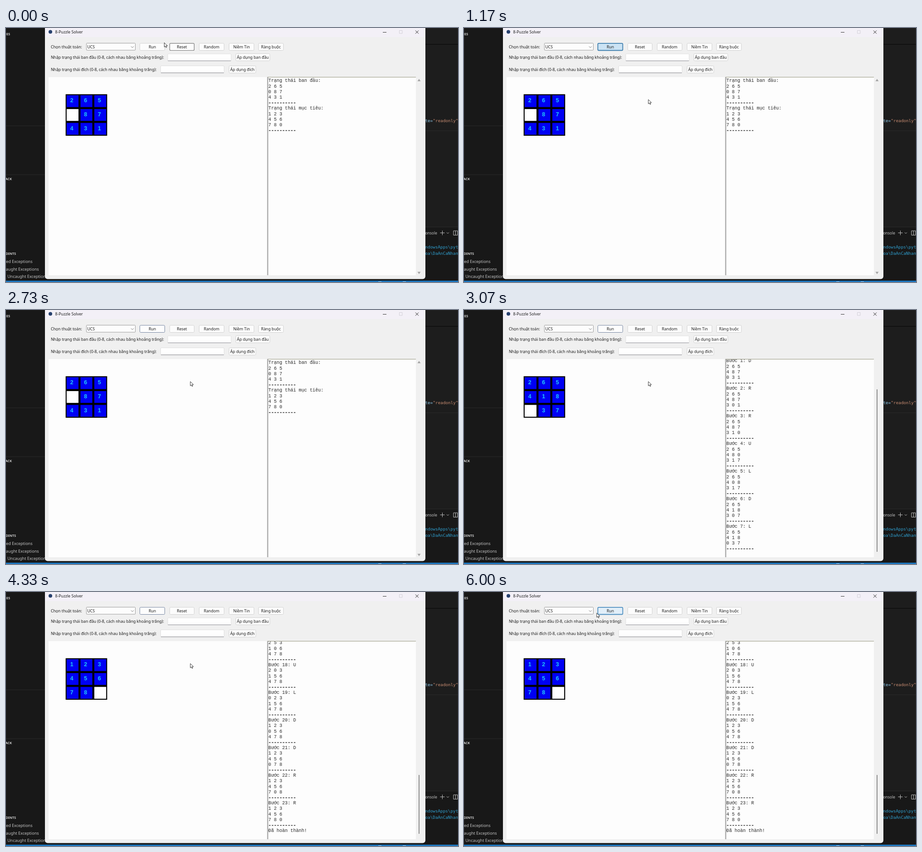
An HTML page for the animation above (6.03 s loop, 998 by 561 pixels).

```html
<!DOCTYPE html>
<html lang="vi">
<head>
<meta charset="utf-8">
<title>8-Puzzle Solver</title>
<style>
  html, body { margin: 0; width: 100%; height: 100%; overflow: hidden; background: #181818; }
  svg { display: block; width: 998px; height: 561px; }
  text { white-space: pre; }
  .ui { font: 8.7px "Noto Sans", "Open Sans", sans-serif; fill: #1c1c1c; }
  .mid { text-anchor: middle; }
  .side { font: 9px "Noto Sans", sans-serif; fill: #c4c4c4; }
  .head { font: bold 7.4px "Noto Sans", sans-serif; fill: #d0d0d0; }
  .end { text-anchor: end; }
  .code { font: 9.3px "DejaVu Sans Mono", monospace; }
  .log { font: 10.17px "Courier New", "Liberation Mono", monospace; fill: #2a2a2a; }
  .rule { stroke: #2a2a2a; stroke-width: .6; }
  .tile { font: bold 12.5px "Liberation Sans", Arial, sans-serif; fill: #20c8fa; text-anchor: middle; }
</style>
</head>
<body>
<svg id="stage" viewBox="0 0 998 561">
  <defs>
    <clipPath id="logClip"><rect x="578" y="109.3" width="327" height="436.7"/></clipPath>
  </defs>
</svg>
<script>
const LOOP = 6030;
const FIRST_STEP = 2738, STEP_MS = 51;
const MOVES = "DRRULDLURDRULURDLULDDRR";
const START = "265087431", GOAL = "123456780";
const LINE = 12.2, VIEW_LINES = 36;
const RULE = "-".repeat(10);
const stage = document.getElementById("stage");

function add(tag, attrs, parent = stage) {
  const el = document.createElementNS("http://www.w3.org/2000/svg", tag);
  for (const key in attrs) el.setAttribute(key, attrs[key]);
  return parent.appendChild(el);
}
const rect = (x, y, width, height, fill, more = {}, parent = stage) =>
  add("rect", { x, y, width, height, fill, ...more }, parent);
const path = (d, stroke, width = 1, fill = "none") =>
  add("path", { d, stroke, "stroke-width": width, fill });
function label(x, y, str, cls, more = {}, parent = stage) {
  const el = add("text", { x, y, class: cls, ...more }, parent);
  el.textContent = str;
  return el;
}

function drawEditor() {
  rect(0, 0, 998, 561, "#181818");
  rect(926, 0, 72, 439, "#1d1d1d");
  rect(926, 35.5, 72, 1.2, "#080808");
  rect(926, 226.5, 72, 1, "#2c2c2c");
  rect(926, 439, 72, 1, "#2c2c2c");
  for (const y of [215.5, 323.5]) rect(0, y, 86, 1, "#2b2b2b");
  label(9, 16, "ES", "head end");
  label(13, 336, "ACK", "head end");
  label(22, 501, "OINTS", "head end");
  label(58.5, 518.5, "ed Exceptions", "side end");
  label(72.5, 536, "aught Exceptions", "side end");
  label(3, 552, "Uncaught Exceptions", "side");
  label(925.5, 208, "te=", "code", { fill: "#8cc8ea" });
  label(942.5, 208, '"readonly"', "code", { fill: "#c98d72" });
  label(952, 456, "onsole", "side end", { style: "font-size:8.5px" });
  path("M958.5 452.5h10M963.5 447.5v10", "#c4c4c4");
  path("M973 451.5l2.5 2.5 2.5-2.5", "#c4c4c4");
  path("M988 448h9v9.5h-9zM992.5 448v9.5", "#c4c4c4");
  label(925.5, 487, "ndowsApps\\pyt", "code", { fill: "#2f9fcf" });
  label(925.5, 500.5, "oa\\DaAnCaNhan", "code", { fill: "#2f9fcf" });
  rect(0, 558, 998, 3, "#1b74bd");
  for (const x of [822, 876]) rect(x, 560, 7, 1, "#a9cbe6");
}

function button(x, y, w, h, str) {
  const box = rect(x + .5, y + .5, w - 1, h - 1, "#fcfcfc", { rx: 2, stroke: "#d2d2d2" });
  label(x + w / 2, y + h / 2 + 3.3, str, "ui mid");
  return box;
}
const topButton = (x, w, str) => button(x, 33.3, w, 16.7, str);

function field(x, y, w, h) {
  rect(x + .5, y + .5, w - 1, h - 1, "#fefefe", { rx: 1.5, stroke: "#dedede" });
  rect(x + 1, y + h - 1, w - 2, 1, "#8c8c94");
}

function drawWindow() {
  rect(86, -10, 840, 564.5, "#f0f0f0", { rx: 6 });
  rect(86, 0, 840, 20, "#f3f0f7");
  add("circle", { cx: 98, cy: 8.5, r: 4, fill: "#27406e" });
  label(108.5, 12, "8-Puzzle Solver", "ui");
  path("M832 9.5h8", "#333");
  path("M868.5 5.5h6.5v6.5h-6.5z", "#d3d0d8");
  path("M904 5.5l7 7M911 5.5l-7 7", "#222");

  label(99, 45, "Chọn thuật toán:", "ui");
  label(99, 68, "Nhập trạng thái ban đầu (0-8, cách nhau bằng khoảng trắng):", "ui");
  label(99, 94.5, "Nhập trạng thái đích (0-8, cách nhau bằng khoảng trắng):", "ui");
  rect(177.5, 33.5, 108, 15.5, "#fdfdfd", { rx: 1, stroke: "#9a9a9a" });
  label(179.5, 45, "UCS", "ui");
  path("M276 40.5l3 3 3-3", "#666", .9);
  field(356.5, 56.5, 141, 16.5);
  field(341, 83, 141, 16.5);
  button(507, 56, 76, 17, "Áp dụng ban đầu");
  button(492, 83, 60, 17, "Áp dụng đích");
  topButton(426, 56, "Random");
  topButton(492, 56, "Niềm Tin");
  topButton(557, 56, "Ràng buộc");

  rect(94, 108.5, 481, 437.5, "#fdfdfd");
  rect(577, 108, 328, 438, "#fdfdfd");
  rect(577, 108, 328, 1.2, "#a3a38f");
  rect(577, 108, .8, 438, "#a0a0a0");
  rect(577.8, 108.8, .8, 437.2, "#696969");
}

function slide(board, move) {
  const cells = [...board], from = cells.indexOf("0");
  const to = from + { U: -3, D: 3, L: -1, R: 1 }[move];
  [cells[from], cells[to]] = [cells[to], cells[from]];
  return cells.join("");
}

const rows = board => [0, 3, 6].map(i => [...board.slice(i, i + 3)].join(" "));
const block = (title, board) => [title, ...rows(board), RULE];

drawEditor();
drawWindow();
const runBtn = topButton(295, 56, "Run");
const resetBtn = topButton(361, 55, "Reset");

const boards = [START];
const lines = [...block("Trạng thái ban đầu:", START), ...block("Trạng thái mục tiêu:", GOAL)];
[...MOVES].forEach((move, i) => {
  boards.push(slide(boards[i], move));
  lines.push(...block(`Bước ${i + 1}: ${move}`, boards[i + 1]));
});
lines.push("Đã hoàn thành!");

const clip = add("g", { "clip-path": "url(#logClip)" });
const log = add("g", {}, clip);
const logLines = lines.map((str, i) =>
  label(579.3, 119.4 + i * LINE, str, str === RULE ? "log rule" : "log", {}, log));

// Each cell is a bordered square on a fixed pitch.
const BOARD = { x: 131.7, y: 146.3, pitch: 30.55, border: 2.2 };
rect(BOARD.x, BOARD.y, BOARD.pitch * 3, BOARD.pitch * 3, "#000");
const tiles = [...START].map((_, i) => {
  const { pitch, border } = BOARD, size = pitch - border * 2;
  const x = BOARD.x + border + (i % 3) * pitch;
  const y = BOARD.y + border + Math.floor(i / 3) * pitch;
  return {
    box: rect(x, y, size, size, "#0000f4"),
    text: label(x + 11.3, y + 15.9, "", "tile")
  };
});

const arrows = add("path", {
  d: "M908.5 117.5h7l-3.5-5zM908.5 538.5h7l-3.5 5z", fill: "#a2a2a2"
});
const thumb = rect(911.2, 0, 1.6, 0, "#777");
const cursor = add("path", {
  d: "M0 0V9.5L2.3 7.5 3.8 10.8 5.3 10.1 3.9 6.9H7z",
  fill: "#fff", stroke: "#222", "stroke-width": .9, "stroke-linejoin": "round"
});

// time, x, y
const TRACK = [
  [0, 349.5, 32.5], [260, 327, 41], [520, 327, 41], [950, 407, 158],
  [5150, 407, 158], [5700, 318, 47], [5850, 310, 45], [6000, 293, 46.5]
];

function cursorAt(t) {
  const i = TRACK.findIndex(p => p[0] > t);
  if (i < 0) return TRACK[TRACK.length - 1].slice(1);
  const [t0, x0, y0] = TRACK[i - 1], [t1, x1, y1] = TRACK[i];
  const u = (t - t0) / (t1 - t0), k = u * u * (3 - 2 * u);
  return [x0 + (x1 - x0) * k, y0 + (y1 - y0) * k];
}

function paint(box, fill, stroke, width) {
  box.setAttribute("fill", fill);
  box.setAttribute("stroke", stroke);
  box.setAttribute("stroke-width", width);
}

function styleButtons(t) {
  const focus = ["#fdfdfd", "#7484a0", 1], plain = ["#fcfcfc", "#d2d2d2", 1];
  const pressed = ["#cbe3f4", "#3f7fae", 1.8], hover = ["#e2eff9", "#4e8fc0", 1.8];
  let run = plain;
  if (t >= 150) run = hover;
  if (t >= 400) run = pressed;
  if (t >= FIRST_STEP - STEP_MS) run = focus;
  if (t >= 5700) run = hover;
  paint(runBtn, ...run);
  paint(resetBtn, ...(t < 400 ? ["#fcfcfc", "#777", 1.2] : plain));
}

function render(t) {
  const step = Math.max(0, Math.min(MOVES.length, Math.floor((t - FIRST_STEP) / STEP_MS) + 1));
  const done = t >= FIRST_STEP + MOVES.length * STEP_MS;
  const shown = 10 + step * 5 + (done ? 1 : 0);
  const over = shown + 1 - VIEW_LINES;
  const scrolled = over >= 0;

  [...boards[step]].forEach((digit, i) => {
    const blank = digit === "0";
    tiles[i].box.setAttribute("fill", blank ? "#fff" : "#0000f4");
    tiles[i].text.textContent = blank ? "" : digit;
  });

  logLines.forEach((el, i) => el.setAttribute("visibility", i < shown ? "visible" : "hidden"));
  log.setAttribute("transform", `translate(0 ${scrolled ? -over * LINE - 4 : 0})`);

  const height = Math.min(413, 16500 / (shown + 1));
  thumb.setAttribute("y", 534 - height);
  thumb.setAttribute("height", height);
  thumb.setAttribute("visibility", scrolled ? "visible" : "hidden");
  arrows.setAttribute("visibility", scrolled ? "hidden" : "visible");

  styleButtons(t);
  cursor.setAttribute("transform", `translate(${cursorAt(t)})`);
}

const origin = performance.now();
function tick() {
  render((performance.now() - origin) % LOOP);
  requestAnimationFrame(tick);
}
tick();
</script>
</body>
</html>
```
